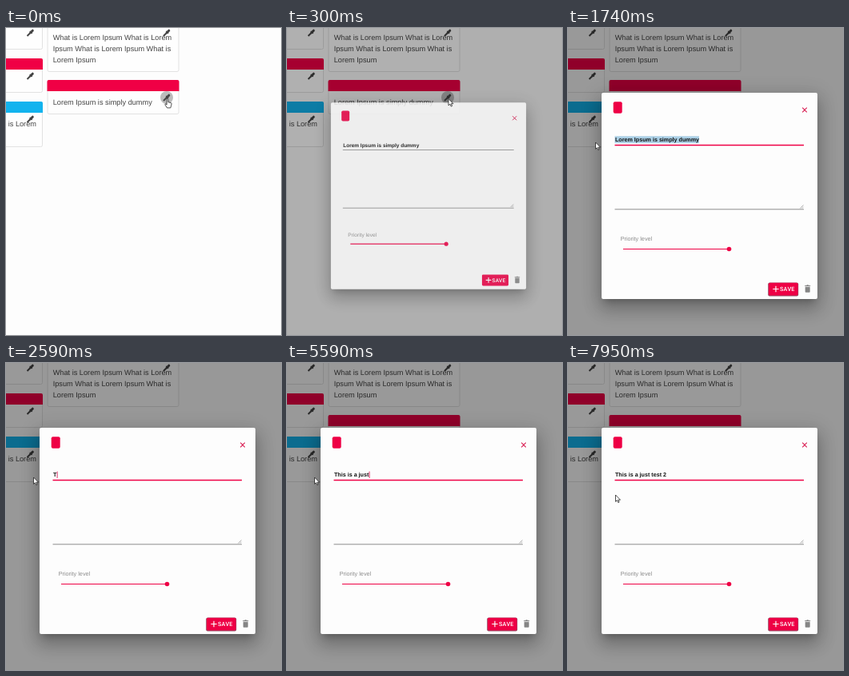
Recreate the animation shown at these times as an HTML page. Size 344 by 384 pixels, loop 8000 ms.

```html
<!DOCTYPE html>
<html lang="en">
<head>
<meta charset="utf-8">
<title>Card editor</title>
<style>
html, body { margin: 0; width: 100%; height: 100%; overflow: hidden; background: #fdfdfd; }
#stage { position: relative; width: 344px; height: 384px; overflow: hidden; }
svg { position: absolute; left: 0; top: 0; width: 344px; height: 384px; }
text { font-family: "Liberation Sans", Arial, sans-serif; text-rendering: geometricPrecision; white-space: pre; }
#shade { position: absolute; inset: 0; background: #000; }
#dialog { position: absolute; inset: 0; transform-origin: 177px 210px; }
#panel {
  position: absolute; left: 42px; top: 81px; width: 270px; height: 258px;
  border-radius: 2px; background: #fdfdfd;
  box-shadow: 0 6px 8px -4px rgba(0,0,0,.22), 0 13px 21px 2px rgba(0,0,0,.18), 0 5px 25px 4px rgba(0,0,0,.14);
}
.body { font-size: 9.2px; fill: #444; }
.title { font-size: 7.16px; font-weight: 700; fill: #111; }
.label { font-size: 7.25px; fill: #8a8a8a; }
.save { font: 500 7.3px Roboto, "Liberation Sans", sans-serif; letter-spacing: .2px; fill: #fff; }
</style>
</head>
<body>
<div id="stage">
  <svg id="board" viewBox="0 0 344 384"></svg>
  <div id="shade"></div>
  <div id="dialog">
    <div id="panel"></div>
    <svg viewBox="0 0 344 384">
      <rect x="56.7" y="92.3" width="11" height="14.4" rx="2" fill="#ee0045"/>
      <path d="M293.2 99.7l5.6 5.6m0-5.6l-5.6 5.6" stroke="#d81b50" stroke-width="1.1"/>
      <rect id="selection" x="58.5" y="135.3" width="0" height="8.8" fill="#abd0e6"/>
      <text id="title" class="title" x="59" y="142.2"></text>
      <rect id="caret" y="135.6" width=".8" height="8.4" fill="#d80045"/>
      <rect id="underline" x="58.5" width="236.5"/>
      <path d="M58.5 226.8H295" stroke="#8d8d8d"/>
      <path d="M290.5 225.5l4-4m-1.8 4l1.8-1.8" stroke="#888" stroke-width=".7"/>
      <text class="label" x="65.7" y="266">Priority level</text>
      <path d="M69 276.5H201" stroke="#ee0045" stroke-width="1.2"/>
      <circle cx="201.5" cy="276.5" r="2.8" fill="#ee0045"/>
      <rect id="saveEdge" x="250.2" y="318.4" width="38" height="17" rx="2" fill="#701030" opacity=".75"/>
      <rect x="251" y="318.8" width="36.6" height="15.6" rx="1.6" fill="#ee0045"/>
      <path d="M256.3 326.5h7.4m-3.7-3.7v7.4" stroke="#fff" stroke-width="1.2"/>
      <text class="save" x="265" y="329.2">SAVE</text>
      <path d="M296.2 322h2l.6-.7h1.8l.6.7h2v1.1h-7zM296.7 323.7h6v6.2q0 .8-.8.8h-4.4q-.8 0-.8-.8z" fill="#858585"/>
    </svg>
  </div>
  <svg viewBox="0 0 344 384">
    <path id="arrow" d="M0 0V8.4L1.9 6.7 3.3 9.6 4.6 9 3.3 6.2H6Z" fill="#fff" stroke="#222" stroke-width=".8" stroke-linejoin="round"/>
    <path id="hand" d="M-.9 1q0-1 .9-1t.9 1V4.2l3.4.9q.9.3.8 1.2L4.5 9.2 3.8 11.4H-.5L-3 7.6q-.4-1 .5-1.2l1.6 1.1Z" fill="#fff" stroke="#222" stroke-width=".8" stroke-linejoin="round"/>
  </svg>
</div>
<script>
const LOOP = 8000, RED = '#f00045', BLUE = '#12b3ee';
const OLD_TITLE = 'Lorem Ipsum is simply dummy', NEW_TITLE = 'This is a just test 2';
const TYPED = [2290, 3590, 3690, 3790, 4010, 4140, 4260, 4360, 4560, 4660, 4860,
  5090, 5290, 5390, 5790, 5890, 6150, 6250, 6350, 6500, 7120];
const $ = id => document.getElementById(id);
const set = (id, attrs) => { for (const k in attrs) $(id).setAttribute(k, attrs[k]); };

const icon = (x, y) => `<g transform="translate(${x} ${y})" stroke="#444" fill="none">
  <path d="M-4 4L0 0" stroke-width="1.9"/><path d="M-.8 -2.2L2.2 .8" stroke-width="1.2"/>
  <path d="M.3 -.3L2.8 -2.8" stroke-width="3" stroke-linecap="round"/></g>`;

function card(x, top, bottom, color, lines, textX, hover) {
  const iconX = x + 149.5, iconY = top + 22;
  return `<rect x="${x + .5}" y="${top + .5}" width="164" height="${bottom - top}" rx="2" fill="#fefefe" stroke="#e2e2e2"/>
    <path d="M${x} ${top + 14}v-12q0-2 2-2h161q2 0 2 2v12z" fill="${color}"/>
    ${hover ? `<circle id="hover" cx="${iconX}" cy="${iconY}" r="8" fill="#bcbcbc"/>` : ''}
    ${lines.map((s, i) => `<text class="body" x="${textX}" y="${top + 31.2 + 14 * i}">${s}</text>`).join('')}
    ${icon(iconX, iconY)}`;
}

$('board').innerHTML =
  card(-119, -16, 26, RED, [], 0) +
  card(-119, 38, 80, RED, [], 0) +
  card(-119, 92, 148, BLUE, ['is Lorem'], 2.7) +
  card(51.5, -16, 54, RED, ['What is Lorem Ipsum What is Lorem', 'Ipsum What is Lorem Ipsum What is', 'Lorem Ipsum'], 58.7) +
  `<g id="edited">${card(51.5, 65, 107, RED, [OLD_TITLE], 58.7, true)}</g>`;

const clamp = v => Math.max(0, Math.min(1, v));
const span = (t, from, to) => clamp((t - from) / (to - from));
const easeOut = u => 1 - (1 - u) ** 3;
const smooth = u => u * u * (3 - 2 * u);

// Pointer path: [start, end, x, y] moves to each point in turn.
const MOVES = [[600, 1100, 166, 139], [1200, 1700, 34.5, 143], [7800, 7950, 59.5, 165]];
function pointer(t) {
  let x = 202, y = 88.5;
  for (const [from, to, px, py] of MOVES) {
    const u = smooth(span(t, from, to));
    x += (px - x) * u;
    y += (py - y) * u;
  }
  return [x, y];
}

function render(t) {
  const tick = t < 1000 ? Math.floor(t / 100) * 100 : t;
  const grow = easeOut(span(tick, 200, 515));
  $('shade').style.opacity = .4 * easeOut(span(tick, 150, 530));
  $('dialog').style.opacity = clamp(grow * 1.2);
  $('dialog').style.transform = `scale(${.7 + .3 * grow})`;

  const [x, y] = pointer(t);
  const clicking = t < 200;
  set('arrow', { transform: `translate(${x} ${y})`, visibility: clicking ? 'hidden' : 'visible' });
  set('hand', { transform: 'translate(202 88.5)', visibility: clicking ? 'visible' : 'hidden' });
  set('hover', { visibility: t < 600 ? 'visible' : 'hidden' });
  set('edited', { visibility: t >= 2290 && t < 3000 ? 'hidden' : 'visible' });

  const count = TYPED.filter(at => at <= t).length;
  const value = t < 2090 ? OLD_TITLE : NEW_TITLE.slice(0, count);
  if ($('title').textContent !== value) $('title').textContent = value;
  const end = 59 + (value ? $('title').getComputedTextLength() : 0);

  const focused = t >= 1200;
  set('underline', { y: focused ? 145.8 : 146, height: focused ? 1.5 : 1, fill: focused ? '#ee0045' : '#8d8d8d' });
  set('saveEdge', { visibility: focused ? 'visible' : 'hidden' });
  const left = Math.max(58.5, Math.min(end, x));
  set('selection', { x: left, width: focused && t < 2090 ? end - left : 0 });

  const last = count ? TYPED[count - 1] : 2090;
  const lit = t >= 2090 && Math.floor((t - last) / 500) % 2 === 0;
  set('caret', { x: end + .3, visibility: lit ? 'visible' : 'hidden' });
}

const start = performance.now();
function frame() {
  render((performance.now() - start) % LOOP);
  requestAnimationFrame(frame);
}
frame();
</script>
</body>
</html>
```
